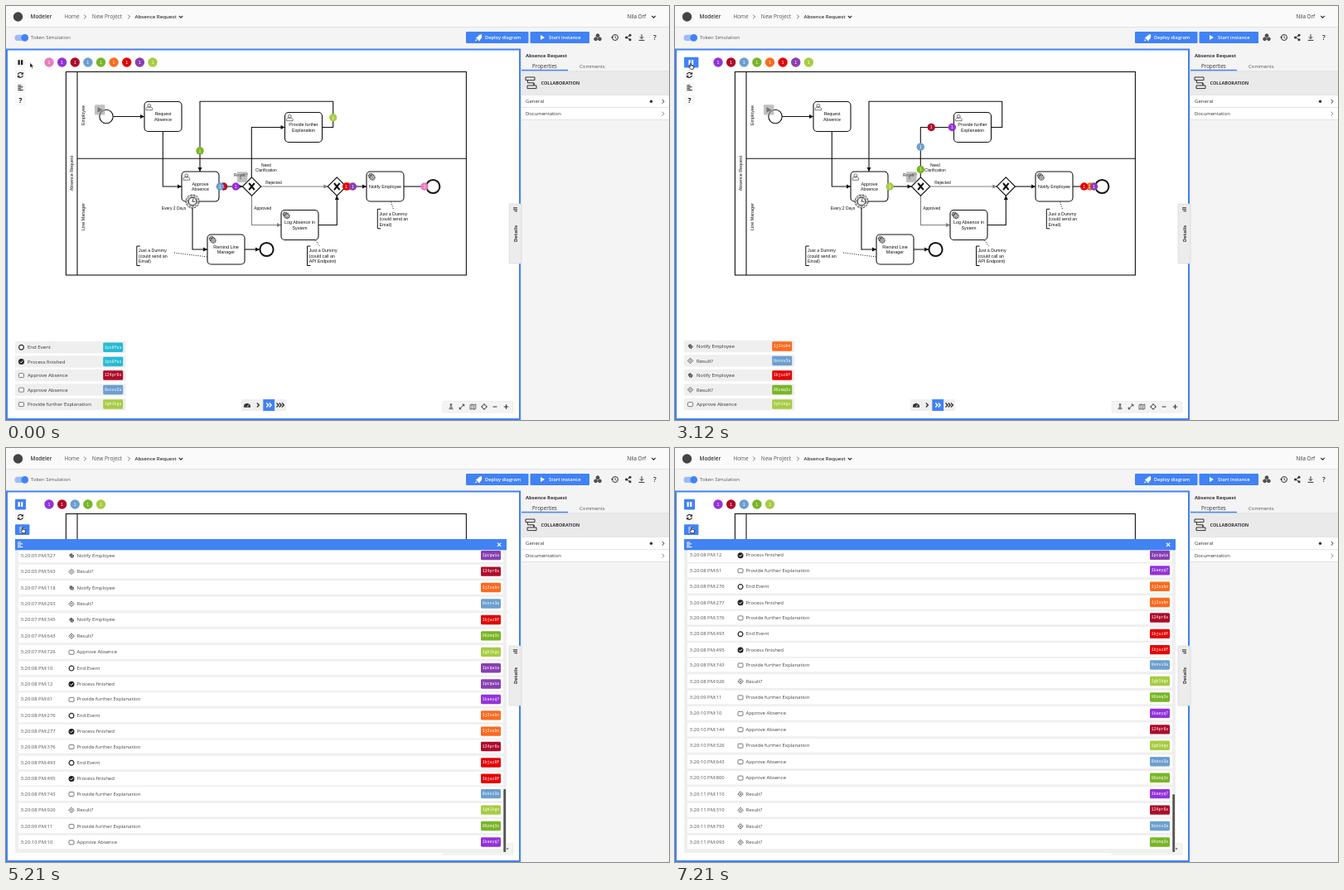
Animation of 800 by 500 pixels, one loop 7.24 s. Source, as an HTML page:

```html
<!DOCTYPE html>
<html lang="en">
<head>
<meta charset="utf-8">
<title>Token simulation</title>
<style>
  html, body { margin: 0; width: 100%; height: 100%; overflow: hidden; background: #fff; }
  svg { display: block; width: 800px; height: 500px; }
  .ui { font-family: "Open Sans", "Noto Sans", sans-serif; }
  .bpmn { font-family: "Liberation Sans", Arial, sans-serif; }
  .mono { font-family: "Liberation Mono", "DejaVu Sans Mono", monospace; }
</style>
</head>
<body>
<svg id="stage" viewBox="0 0 800 500" xmlns="http://www.w3.org/2000/svg"></svg>
<script>
const LOOP = 7240, CLOCK_START = 4.82;
const PAUSE = 5.71, RESUME = 7.116;
const PANEL_OPEN = 4600, LABEL_TTL = 0.5;
const BLUE = '#4182f5', INK = '#333';

// ---------- drawing helpers ----------
const rect = (x, y, w, h, fill, rx = 0, more = '') =>
  `<rect x="${x}" y="${y}" width="${w}" height="${h}" rx="${rx}" fill="${fill}" ${more}/>`;
const circle = (x, y, r, fill = 'none', stroke = 'none', w = 1, more = '') =>
  `<circle cx="${x}" cy="${y}" r="${r}" fill="${fill}" stroke="${stroke}" stroke-width="${w}" ${more}/>`;
const path = (d, stroke = INK, w = 1, fill = 'none', more = '') =>
  `<path d="${d}" stroke="${stroke}" stroke-width="${w}" fill="${fill}" ${more}/>`;
const solid = (d, fill = INK) => path(d, 'none', 0, fill);
const text = (x, y, s, { size = 6, weight = 400, fill = INK, anchor = 'start', font = 'ui', more = '' } = {}) =>
  `<text class="${font}" x="${x}" y="${y}" font-size="${size}" font-weight="${weight}" fill="${fill}" text-anchor="${anchor}" ${more}>${s}</text>`;
const at = (x, y, s) => `<g transform="translate(${x} ${y})">${s}</g>`;
const chevron = (x, y, color = INK, w = 1) => path(`M${x - 1.3} ${y - 2.4}l2.4 2.4l-2.4 2.4`, color, w);
const chevronDown = (x, y) => path(`M${x - 2.2} ${y - 1}l2.2 2.2l2.2 -2.2`, INK, 1.1);
const check = (x, y, r, fill, tick) =>
  circle(x, y, r, fill) + path(`M${x - r * .5} ${y}l${r * .4} ${r * .4}l${r * .65} ${-r * .75}`, tick, 1);
const gear = (x, y, r) =>
  circle(x, y, r, '#fff', '#222', 1.1, 'stroke-dasharray="1 .7"') + circle(x, y, r * .72, '#fff', '#222', .6) + circle(x, y, r * .3, 'none', '#222', .5);
const gears = (x, y, s = 1) => gear(x - .9 * s, y - .9 * s, 2.5 * s) + gear(x + 1 * s, y + 1 * s, 2.8 * s);
const lines = (x, y, color) =>
  path(`M${x - 3} ${y - 2.8}h4M${x - 3} ${y - .9}h6M${x - 3} ${y + 1}h4M${x - 3} ${y + 2.9}h6.3`, color, 1);
const chip = (x, y, r, color) =>
  circle(x, y, r, color) + text(x, y + 1.9, '1', { size: 5.4, fill: '#fff', anchor: 'middle', font: 'bpmn' });

// ---------- static parts ----------
function header() {
  const share = path('M748.8 38l4 -2.5M748.8 38l4 2.5', INK, .9) +
    [[748.5, 38], [753, 35.3], [753, 40.7]].map(([x, y]) => circle(x, y, 1.5, INK)).join('');
  const cluster = [[714, 35.7], [711.6, 39.8], [716.4, 39.8]].map(([x, y]) => circle(x, y, 1.9, '#555', INK, .8)).join('');
  return rect(0, 0, 800, 25, '#fafafa') + rect(0, 25, 800, 27, '#f4f4f4') + rect(0, 25, 800, .7, '#dcdcdc') +
    circle(14.5, 13, 5.7, '#444') +
    text(29.5, 15.2, 'Modeler', { size: 6.4, weight: 600 }) +
    text(70.5, 15.2, 'Home', { size: 6.4, fill: '#555' }) + chevron(95.5, 13, '#555', .8) +
    text(103.8, 15.2, 'New Project', { size: 6.5, fill: '#555' }) + chevron(148.5, 13, '#555', .8) +
    text(155.5, 15.2, 'Absence Request', { size: 6.1, weight: 600 }) + chevronDown(211, 13) +
    text(749.5, 15.2, 'Nila Orf', { size: 6.3 }) + chevronDown(781.5, 13) +
    rect(10.5, 34.8, 16, 7.2, '#9bbcf8', 3.6) + circle(22.7, 38.4, 4.3, BLUE) +
    text(30, 40.2, 'Token Simulation', { fill: '#555' }) +
    rect(555, 31, 75.5, 14, BLUE, 1) + rect(632.5, 31, 71.5, 14, BLUE, 1) +
    solid('M574 34.2c-3 0 -4.5 2 -5.3 3.4l-2 .4l1.5 1.4l1.8 1.8l1.4 1.5l.4 -2c1.4 -.8 3 -2.4 2.2 -6.5zM567 40l-1 2.5l2.6 -1z', '#fff') +
    text(578, 40, 'Deploy diagram', { size: 5.7, weight: 600, fill: '#fff' }) +
    solid('M645 35l5 3l-5 3z', '#fff') +
    text(655, 40, 'Start instance', { size: 5.75, weight: 600, fill: '#fff' }) +
    cluster + circle(735, 38, 3.5, 'none', INK, 1) + path('M735 35.8v2.4l1.7 1', INK, .8) + solid('M730 37.2h3l-1.5 2z') +
    share + path('M767 34.2v5M764.8 37.3l2.2 2.2l2.2 -2.2M763.6 41.4h6.8', INK, 1) +
    text(783, 41, '?', { size: 8.4, weight: 600, anchor: 'middle' });
}

function sidePanel() {
  return rect(621, 52, 179, 448, '#f4f4f4') + rect(621.5, 52, .6, 448, '#d8d8d8') +
    text(627, 61.6, 'Absence Request', { size: 5.9, weight: 700 }) +
    text(635, 75.2, 'Properties', { size: 6.2 }) + text(692, 75.2, 'Comments', { size: 6, fill: '#555' }) +
    rect(622, 79, 178, 28, '#eaeaea') + rect(622, 78.6, 178, .6, '#d4d4d4') + rect(622, 76.8, 56, 1.5, BLUE) +
    path('M627 86h11v3.6h-11zM629 96h11v3.6h-11zM629.5 89.6v3.2h7.5v3.2', INK, 1) + solid('M635.6 93.4h2.8l-1.4 2z') +
    text(645.5, 94.6, 'COLLABORATION', { size: 5.5, weight: 700 }) +
    rect(622, 107, 178, 30, '#fff') + rect(622, 107, 178, .6, '#d4d4d4') +
    text(627, 117.4, 'General', { size: 6.1 }) + circle(778.5, 115.3, 1.7, INK) + chevron(793, 115.3) +
    rect(622, 122.4, 178, .6, '#d4d4d4') +
    text(627, 132.3, 'Documentation', { size: 5.9 }) + chevron(793, 130.2, '#888') + rect(622, 137, 178, .6, '#d4d4d4');
}

const detailsTab = () =>
  rect(607, 239, 15, 72, '#ececec', 1, 'stroke="#d6d6d6" stroke-width=".6"') +
  path('M612 243.8h5M612 245.8h5M613.5 247.8h3.5', INK, 1.1) +
  text(0, 0, 'Details', { size: 5.8, weight: 700, anchor: 'middle', more: 'transform="translate(616.6 275) rotate(-90)"' });

function flow(points, color = '#111') {
  const [x, y] = points[points.length - 1], [px, py] = points[points.length - 2];
  const angle = Math.atan2(y - py, x - px) * 180 / Math.PI;
  return path('M' + points.map(p => p.join(' ')).join('L'), color, 1.1, 'none', 'stroke-linejoin="round"') +
    `<path d="M0 0l-5 -2.5v5z" fill="${color}" transform="translate(${x} ${y}) rotate(${angle})"/>`;
}

function task(x, y, kind, ...label) {
  const icon = kind === 'user'
    ? circle(x + 5.8, y + 4.8, 1.9, '#fff', '#222', .6) + path(`M${x + 2} ${y + 10.2}v-2q.6 -1.4 2.4 -1.8q1.4 1 2.8 0q1.9 .4 2.4 1.8v2z`, '#222', .6)
    : gears(x + 6, y + 6, 1.1);
  const first = y + 20 - (label.length - 1) * 3.2;
  return rect(x, y, 45, 36, '#fff', 4.5, 'stroke="#111" stroke-width="1.1"') + icon +
    label.map((s, i) => text(x + 22.5, first + i * 6.4, s, { size: 5.4, anchor: 'middle', font: 'bpmn', fill: '#111' })).join('');
}

const gateway = (x, y) =>
  path(`M${x} ${y - 11.2}l11.2 11.2l-11.2 11.2l-11.2 -11.2z`, '#111', 1.1, '#fff') +
  path(`M${x - 3.3} ${y - 4}l6.6 8M${x + 3.3} ${y - 4}l-6.6 8`, '#111', 2);

const note = (x, y, ...label) =>
  path(`M${x + 4} ${y}h-4v23.5h4`, '#111', 1) +
  label.map((s, i) => text(x + 2.2, y + 7.2 + i * 6.5, s, { size: 5.3, font: 'bpmn', fill: '#111' })).join('');

const dotted = d => path(d, '#111', 1, 'none', 'stroke-dasharray="1 1.6"');

function diagram() {
  const label = (x, y, s, anchor = 'start') => text(x, y, s, { size: 4.95, font: 'bpmn', fill: '#111', anchor });
  const upright = (x, y, s) => text(0, 0, s, { size: 5.4, font: 'bpmn', fill: '#111', anchor: 'middle', more: `transform="translate(${x} ${y}) rotate(-90)"` });
  const grey = '#808080';
  return rect(72.4, 79.5, 483, 245.5, '#fff', 0, 'stroke="#111" stroke-width="1.1"') +
    path('M86 79.5v245.5M86 184.3h469.4', '#111', 1.1) +
    upright(81, 202, 'Absence Request') + upright(94.5, 132, 'Employee') + upright(94.5, 254.5, 'Line Manager') +
    flow([[129, 133.5], [167, 133.5]]) + flow([[189.3, 151.5], [189.3, 218], [212, 218]]) +
    flow([[225, 244], [225, 294], [243, 294]]) + flow([[288, 294], [306, 294]]) +
    flow(ROUTES.AG) + flow(ROUTES.GP) + flow(ROUTES.PA) +
    flow([[308, 218], [388.3, 218]], grey) + flow([[296.5, 229], [296.5, 264.5], [332, 264.5]], grey) +
    flow([[377, 264.5], [399.3, 264.5], [399.3, 229]]) + flow(ROUTES.XN) + flow([[480, 218], [507, 218]]) +
    circle(121, 133.5, 8.2, '#fff', '#111', 1.1) + circle(314.5, 294, 8.1, '#fff', '#111', 2) + circle(515.3, 218, 8.1, '#fff', '#111', 2) +
    task(167, 115.5, 'user', 'Request', 'Absence') + task(212, 200, 'user', 'Approve', 'Absence') +
    task(336.5, 128.5, 'user', 'Provide further', 'Explanation') + task(243, 276, 'service', 'Remind Line', 'Manager') +
    task(332, 246.5, 'service', 'Log Absence in', 'System') + task(435, 200, 'service', 'Notify Employee') +
    gateway(296.5, 218) + gateway(399.3, 218) +
    circle(225, 236, 8, '#fff', '#111', .8, 'stroke-dasharray="3 .8"') + circle(225, 236, 6.4, 'none', '#111', .7, 'stroke-dasharray="3 .8"') +
    circle(225, 236, 4.8, '#fff', '#111', 1) + path('M226 232.6l-1 3.6h3', '#111', .8) +
    label(202.5, 246.3, 'Every 2 Days', 'middle') + label(275, 206.2, 'Result?') +
    label(313.8, 194, 'Need', 'middle') + label(313.8, 199.8, 'Clarification', 'middle') +
    label(313.2, 214.7, 'Rejected') + label(299.2, 246.2, 'Approved') +
    dotted('M203 298l40 5') + dotted('M373.5 283l5 7') + dotted('M464.5 236.5l3 9') +
    note(157.8, 290, 'Just a Dummy', '(could send an', 'Email)') +
    note(363.5, 290, 'Just a Dummy', '(could call an', 'API Endpoint)') +
    note(448.3, 245.3, 'Just a Dummy', '(could send an', 'Email)');
}

const contextPads = () =>
  rect(107, 119.2, 12.4, 12.4, '#999', 1, 'opacity=".62"') + solid('M110.5 122l6 3.4l-6 3.4z', '#777') +
  rect(279, 200.3, 12.4, 12.6, '#999', 1, 'opacity=".62"') + path('M283 209.5v-5.5h4.5M286 202.6l1.8 1.4l-1.8 1.4', '#666', .9);

function footer() {
  const zoom = path('M537 481v4M535 484.6q2 1.4 4 0M534.4 486.6h5.2', INK, .8) + circle(537, 481.4, 1, 'none', INK, .7) +
    path('M547.3 486.7l5.4 -5.4M550.5 481.2h2.3v2.3M547.2 484.5v2.3h2.3', INK, .9) +
    path('M560 481.7l2.2 -.8l2.4 .8l2.2 -.8v5.6l-2.2 .8l-2.4 -.8l-2.2 .8zM562.2 481v5.4M564.6 481.7v5.4', INK, .7) +
    circle(577, 484, 2.5, 'none', INK, .8) + path('M577 480v2M577 486v2M573 484h2M579 484h2', INK, .8) +
    path('M587.5 484h5M600.8 484h5.4M603.5 481.3v5.4', INK, 1.1);
  return rect(284, 475, 54, 14, '#efefef', 1) + rect(310.3, 475, 13.8, 14, BLUE) +
    solid('M287 484.8a4.1 4.1 0 1 1 8 0z') + path('M291 484l2 -2.6', '#fff', .8) +
    chevron(304.2, 482, INK, 1.4) + chevron(315.6, 482, '#fff', 1.4) + chevron(319, 482, '#fff', 1.4) +
    [327.8, 331, 334.2].map(x => chevron(x, 482, INK, 1.4)).join('') +
    rect(527, 477.5, 85, 13.5, '#f4f4f4', 1, 'stroke="#e2e2e2" stroke-width=".5"') + zoom;
}

// ---------- simulation model ----------
// Stops: A approve, G gateway, P provide, X merge, N notify, E end, F finished.
const ROUTES = {
  AG: [[257, 218], [285.5, 218]],
  GP: [[296.3, 207], [296.3, 146.5], [336.5, 146.5]],
  PA: [[381.5, 146.5], [394.7, 146.5], [394.7, 115.3], [234, 115.3], [234, 200]],
  XN: [[410.5, 218], [435, 218]],
  NE: [[480, 218], [505.8, 218]],
};
const NAMES = { A: 'Approve Absence', G: 'Result?', P: 'Provide further Explanation', N: 'Notify Employee', E: 'End Event', F: 'Process finished' };
const instance = (id, color, trip) => ({ id, color, stops: trip.split(' ').map(s => ({ kind: s[0], time: +s.slice(1) })) });
const INSTANCES = [
  instance('1ps8fus', '#27bbd3', 'N3.2 E4.3 F4.302'),
  instance('09tmyms', '#ea7cc0', 'N3.85 E4.95 F4.952'),
  instance('1kaeyq7', '#9432da', 'A4.13 G5.21 P8.061 A10.01 G11.11 P12.6'),
  instance('124pr6s', '#ae0c2a', 'A4.5 G5.593 P8.376 A10.144 G11.31 P12.7'),
  instance('0snsv3a', '#6c9fd0', 'A4.66 G7.293 P8.743 A10.643 G11.793 P13.2'),
  instance('06zmq3x', '#79b526', 'P3.26 A5.09 G7.643 P9.011 A10.86 G11.993 P13.4'),
  instance('1j2xubn', '#fb6a1f', 'X4.6 N7.118 E8.276 F8.277'),
  instance('1bjuz8f', '#e30505', 'X4.78 N7.345 E8.493 F8.495'),
  instance('1pcqwia', '#893fb1', 'X4.38 N5.527 E8.01 F8.012'),
  instance('1gh1kgs', '#a7cc42', 'P4.68 A7.726 G8.926 P10.326 A12.2'),
];
const LOG = INSTANCES.flatMap(i => i.stops.filter(s => s.kind !== 'X').map(s => ({ ...s, name: NAMES[s.kind], id: i.id, color: i.color })))
  .sort((a, b) => a.time - b.time);
const NOTICES = [...LOG, { kind: 'I', time: PAUSE, name: 'Pause Simulation' }, { kind: 'I', time: RESUME, name: 'Play Simulation' }]
  .sort((a, b) => a.time - b.time);

const clamp = (v, lo = 0, hi = 1) => Math.min(hi, Math.max(lo, v));
const running = time => time - clamp(time - PAUSE, 0, RESUME - PAUSE);

function ease(p, index, count) {
  if (count === 1) return (1 - Math.cos(p * Math.PI)) / 2;
  if (index === 0) return 1 - Math.cos(p * Math.PI / 2);
  if (index === count - 1) return Math.sin(p * Math.PI / 2);
  return p;
}

function along(points, progress) {
  const legs = points.slice(1).map((p, i) => ({ a: points[i], b: p, size: Math.hypot(p[0] - points[i][0], p[1] - points[i][1]) }));
  let rest = progress * legs.reduce((sum, l) => sum + l.size, 0);
  let i = 0;
  while (i < legs.length - 1 && rest > legs[i].size) rest -= legs[i++].size;
  const { a, b, size } = legs[i], k = ease(clamp(rest / size), i, legs.length);
  return [a[0] + (b[0] - a[0]) * k, a[1] + (b[1] - a[1]) * k];
}

function tokens(now) {
  return INSTANCES.map(({ stops, color }) => {
    const i = stops.findIndex((s, n) => s.time <= now && stops[n + 1] && now < stops[n + 1].time);
    const route = i >= 0 && ROUTES[stops[i].kind + stops[i + 1].kind];
    if (!route) return '';
    const start = running(stops[i].time), end = running(stops[i + 1].time);
    const [x, y] = along(route, (running(now) - start) / (end - start));
    return chip(x, y, 4.7, color);
  }).join('');
}

const instanceBar = now => INSTANCES
  .filter(({ stops }) => { const last = stops[stops.length - 1]; return last.kind !== 'F' || now < last.time; })
  .map((i, n) => chip(52 + n * 15.62, 68, 5.7, i.color)).join('');

function finishedLabel(now) {
  const done = LOG.filter(e => e.kind === 'F' && e.time <= now && now < e.time + LABEL_TTL).pop();
  return done ? rect(516.7, 203.8, 38, 12.6, done.color) + check(522, 210, 3, '#fff', done.color) +
    text(526.5, 212.2, 'Finished', { fill: '#fff', size: 5.9 }) : '';
}

// ---------- log rows ----------
const ROW_ICONS = {
  A: () => rect(-3, -2.4, 6, 5, '#fff', 1, 'stroke="#444" stroke-width=".7"'),
  G: () => path('M0 -3.2l3.2 3.2l-3.2 3.2l-3.2 -3.2z', '#444', .8) + path('M0 -1.2l1.2 1.2l-1.2 1.2l-1.2 -1.2z', '#444', .7),
  N: () => gears(0, 0, .62),
  E: () => circle(0, 0, 2.9, '#fff', '#222', 1.2),
  F: () => check(0, 0, 3.5, '#222', '#fff'),
  I: () => solid('M-1.4 -.8h2.2v3h.8v1h-3.2v-1h.8v-2h-.6zM-.8 -3.2h1.6v1.6h-1.6z', '#222'),
};
ROW_ICONS.P = ROW_ICONS.A;
const rowIcon = (e, x, y) => at(x, y, ROW_ICONS[e.kind]());
const tag = (e, x, y) => e.id ? rect(x, y - 5.7, 24, 11.4, e.color, 1.4) +
  text(x + 12, y + 1.3, e.id, { size: 4.9, fill: '#fff', anchor: 'middle', font: 'mono' }) : '';

// Stacks rows upwards from the bottom edge; compact kinds take less height.
function stack(entries, bottom, pitch, draw) {
  const compact = e => e.kind === 'F' || e.kind === 'I';
  const step = e => pitch - (compact(e) ? 1 : e.kind === 'E' ? .25 : 0);
  let out = '', y = bottom;
  for (let i = entries.length - 1; i >= 0; i--) {
    y = i === entries.length - 1 ? bottom + (compact(entries[i]) ? 1 : 0) : y - step(entries[i]);
    out += draw(entries[i], y);
  }
  return out;
}

const notifications = now => stack(NOTICES.filter(e => e.time <= now).slice(-5), 481, 17.5, (e, y) =>
  rect(11, y - 7.2, 133.5, 14.4, '#efefef', 1) + rowIcon(e, 18.5, y) + text(26, y + 2, e.name) + tag(e, 117.2, y));

function stamp(time) {
  const ms = Math.round(time * 1000);
  return `3:20:${String(Math.floor(ms / 1000)).padStart(2, '0')} PM:${ms % 1000}`;
}

function logPanel(now) {
  const entries = LOG.filter(e => e.time <= now);
  const thumb = 365 * 365 / (1135 + entries.length * 19.3);
  const rows = stack(entries.slice(-20), 476, 19.45, (e, y) =>
    rect(15, y - 8.3, 585, 16.6, '#fff', 1) + text(17.6, y + 2, stamp(e.time), { size: 5.9, fill: '#555' }) +
    rowIcon(e, 79, y + .3) + text(85.5, y + 2, e.name, { fill: '#444' }) + tag(e, 573, y));
  return rect(11, 110, 593, 379, '#efefef') + `<g clip-path="url(#logClip)">${rows}</g>` +
    rect(11, 110, 593, 13.3, BLUE) + lines(17, 116.7, '#fff') +
    path('M593 114.6l4.3 4.3M597.3 114.6l-4.3 4.3', '#fff', 1.3) +
    rect(600.3, 488 - thumb, 2.8, thumb, '#555', 1);
}

// ---------- palette and pointer ----------
function palette(t, now, hover) {
  const paused = now >= PAUSE && now < RESUME;
  const button = (i, active, icon) => {
    const over = hover === i, y = 61.7 + i * 15.3;
    return rect(11, y, over ? 17.4 : 13, 12.8, over || active ? BLUE : '#f8f8f8', 1) +
      icon(over ? 19.3 : 17.4, y + 6.4, over || active ? '#fff' : '#222');
  };
  return button(0, now >= PAUSE, (x, y, c) => paused
      ? solid(`M${x - 2.5} ${y - 3}l5.5 3l-5.5 3z`, c)
      : rect(x - 2.9, y - 2.9, 2.3, 5.8, c) + rect(x + .6, y - 2.9, 2.3, 5.8, c)) +
    button(1, false, (x, y, c) => path(`M${x - 3} ${y - .5}a3 3 0 0 1 5.4 -1.2M${x + 3} ${y + .5}a3 3 0 0 1 -5.4 1.2`, c, 1.1) +
      solid(`M${x + 3.5} ${y - 3.6}v3h-3zM${x - 3.5} ${y + 3.6}v-3h3z`, c)) +
    button(2, t >= PANEL_OPEN, lines) +
    button(3, false, (x, y, c) => text(x, y + 3, '?', { size: 8.4, weight: 700, anchor: 'middle', fill: c }));
}

function pointer(t) {
  const smooth = p => p * p * (3 - 2 * p);
  const a = smooth(clamp((t - 250) / 400)), b = smooth(clamp((t - 4150) / 350));
  const x = 29 - 10 * a + b, y = 68.5 + a + 26.5 * b;
  const hover = x > 28 ? -1 : y < 76.5 ? 0 : y < 91.5 ? 1 : 2;
  const shape = hover < 0
    ? path('M0 0v6l1.4 -1.2l1 2.2l1 -.5l-1 -2.1h1.8z', '#fff', .5, '#000')
    : path('M-.7 0q.7 -.8 1.3 0v2.4l2.5 .6q.7 .3 .6 1.2l-.6 2.6h-3.3l-2 -2.7q.3 -1 1.5 0z', '#000', .7, '#fff');
  return { hover, markup: at(x, y, shape) };
}

// ---------- assembly ----------
const stage = document.getElementById('stage');
stage.innerHTML = `<defs><clipPath id="logClip"><rect x="11" y="123" width="593" height="366"/></clipPath></defs>
  ${rect(0, 0, 800, 500, '#fff')}${header()}${sidePanel()}
  <rect id="frame" x="1" y="52.5" width="619" height="446.5" fill="#fff" stroke="${BLUE}" stroke-width="2"/>
  ${diagram()}<g id="tokens"></g>${contextPads()}${footer()}<g id="overlay"></g>${detailsTab()}<g id="pointer"></g>`;
const [frame, tokenLayer, overlay, pointerLayer] = ['frame', 'tokens', 'overlay', 'pointer'].map(id => document.getElementById(id));

function render(t) {
  const now = CLOCK_START + t / 1000;
  const { hover, markup } = pointer(t);
  frame.setAttribute('stroke', now >= PAUSE && now < RESUME ? '#909090' : BLUE);
  tokenLayer.innerHTML = tokens(now);
  overlay.innerHTML = finishedLabel(now) + palette(t, now, hover) + instanceBar(now) +
    (t >= PANEL_OPEN ? logPanel(now) : notifications(now));
  pointerLayer.innerHTML = markup;
}

const origin = performance.now();
function tick() {
  render((performance.now() - origin) % LOOP);
  requestAnimationFrame(tick);
}
render(0);
requestAnimationFrame(tick);
</script>
</body>
</html>
```
